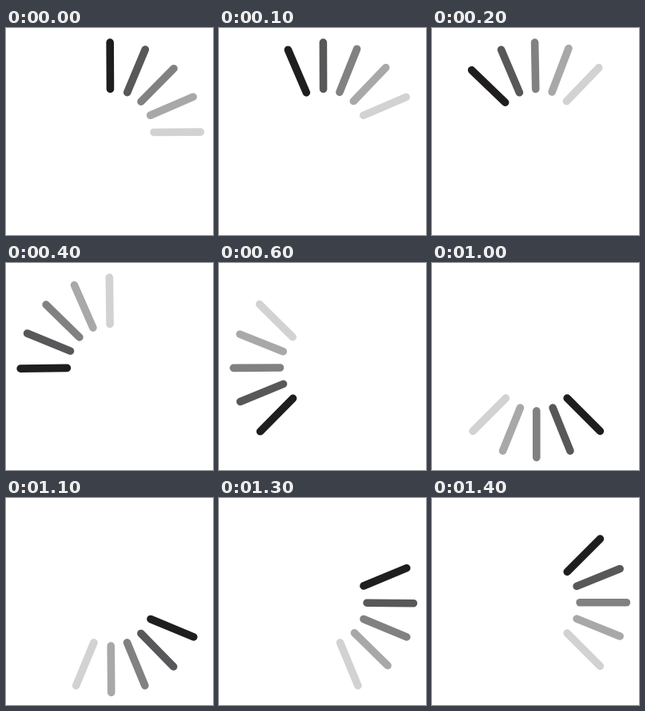
Recreate the animation shown at these times as an HTML page. Size 259 by 259 pixels, loop 1.5 s.

```html
<!DOCTYPE html>
<html lang="en">
<head>
<meta charset="utf-8">
<title>Spinner</title>
<style>
html, body { margin: 0; width: 100%; height: 100%; overflow: hidden; background: #fff; }
svg { display: block; width: 100vw; height: 100vh; }
</style>
</head>
<body>
<svg viewBox="0 0 259 259">
  <g id="fan" stroke-width="9.6" stroke-linecap="round"></g>
</svg>
<script>
const STEP_MS = 100, STEPS = 15, ANGLE = 22.5;
const CENTER = 130.75, INNER = 54.3, OUTER = 112.6;
const BARS = [
  { angle: 0, shade: '#1f1d1e' },
  { angle: 23, shade: '#58585a' },
  { angle: 45, shade: '#818181' },
  { angle: 67, shade: '#a8a8a8' },
  { angle: 90, shade: '#d2d2d2' }
];
const fan = document.getElementById('fan');
const turn = deg => `rotate(${deg} ${CENTER} ${CENTER})`;

for (const { angle, shade } of BARS) {
  const bar = document.createElementNS('http://www.w3.org/2000/svg', 'line');
  const attrs = {
    x1: CENTER, x2: CENTER, y1: CENTER - INNER, y2: CENTER - OUTER,
    stroke: shade, transform: turn(angle)
  };
  for (const key in attrs) bar.setAttribute(key, attrs[key]);
  fan.append(bar);
}

// Slight overshoot that peaks at the third step and then fades out
const lean = n => n < 2 ? 0.3 + 0.4 * n : Math.max(0, 1.1 - 0.2 * (n - 2));

function draw(ms) {
  const n = Math.floor(ms / STEP_MS) % STEPS;
  fan.setAttribute('transform', turn(-n * ANGLE - lean(n)));
}

let start;
function tick(now) {
  start ??= now;
  draw(Math.max(0, now - start));
  requestAnimationFrame(tick);
}
draw(0);
requestAnimationFrame(tick);
</script>
</body>
</html>
```
